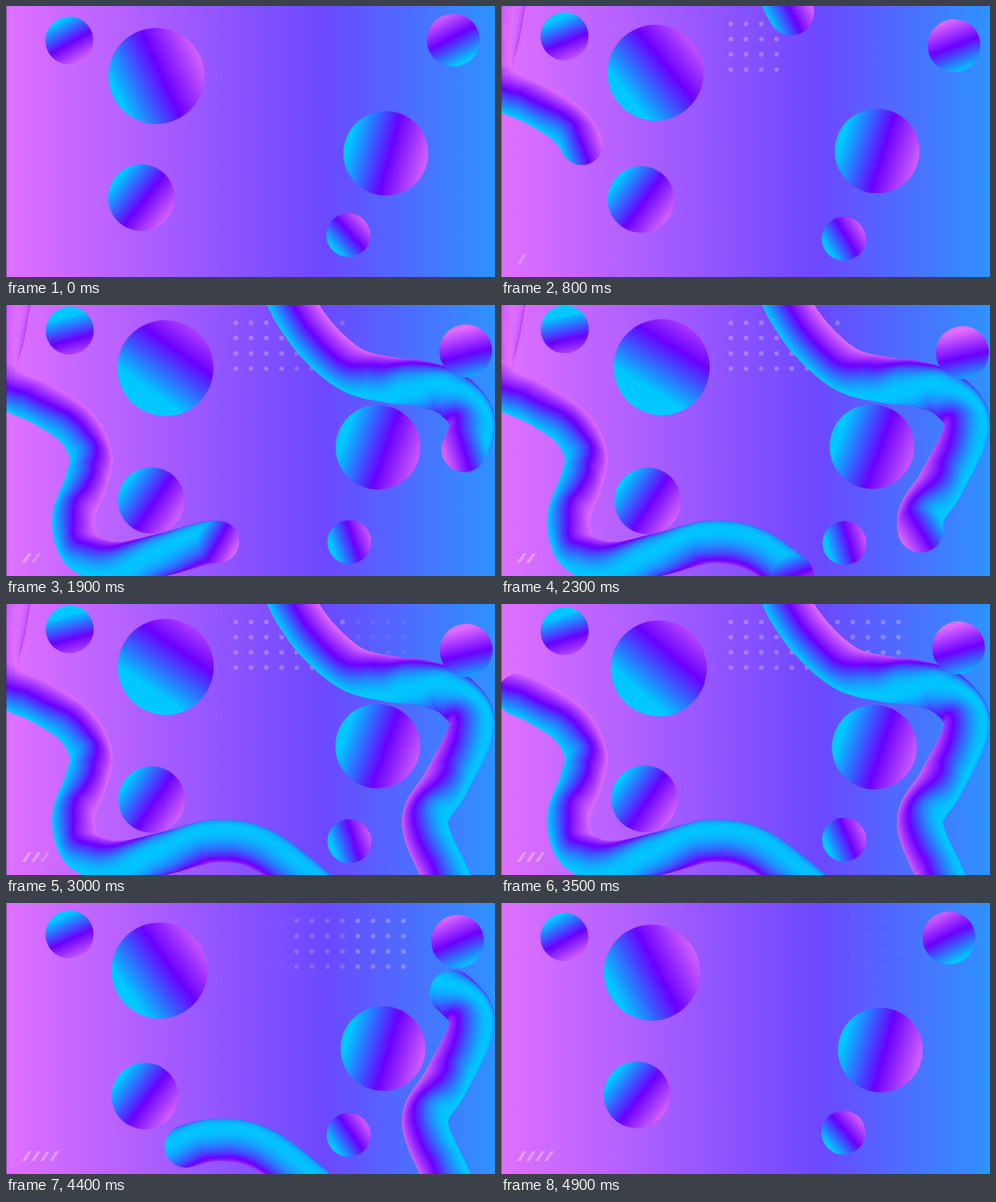
These frames come from a looping animation (600x333 px, 5 s). An HTML page with a canvas:

```html
<!DOCTYPE html>
<html lang="en">
<head>
<meta charset="utf-8">
<title>Fluid gradient shapes</title>
<style>
html, body { margin: 0; width: 100%; height: 100%; overflow: hidden; }
canvas { display: block; width: 600px; height: 333px; }
</style>
</head>
<body>
<canvas id="stage" width="600" height="333"></canvas>
<script>
const ctx = document.getElementById('stage').getContext('2d');
const W = 600, H = 333, LOOP = 5000;
const CYAN = '#00c8ff', VIOLET = '#6a00ff', PINK = '#e06eff';

const ramp = (t, from, to) => Math.min(1, Math.max(0, (t - from) / (to - from)));
const smooth = u => u * u * (3 - 2 * u);

function gradient(x0, x1, stops) {
  const g = ctx.createLinearGradient(x0, 0, x1, 0);
  stops.forEach(([at, color]) => g.addColorStop(at, color));
  return g;
}
const blend = (x0, x1) => gradient(x0, x1, [[0, CYAN], [0.5, VIOLET], [1, PINK]]);

// Disc with its cyan-to-pink axis turned to the given angle in degrees
function disc(x, y, r, angle, fill) {
  const c = Math.cos(angle * Math.PI / 180), s = Math.sin(angle * Math.PI / 180);
  ctx.setTransform(c, s, -s, c, x, y);
  ctx.fillStyle = fill;
  ctx.beginPath();
  ctx.arc(0, 0, r, 0, 7);
  ctx.fill();
  ctx.resetTransform();
}

// Stack of discs along a smooth path; twist(fraction) turns each disc
// relative to its direction of travel
function makeTube(r, knots, twist) {
  const spline = (a, b, c, d, u) => b + u / 2 * (c - a +
    u * (2 * a - 5 * b + 4 * c - d + u * (3 * (b - c) + d - a)));
  const at = i => knots[Math.min(knots.length - 1, Math.max(0, i))];
  const discs = [];
  let length = 0, last = knots[0];
  for (let i = 0; i < knots.length - 1; i++) {
    for (let k = 1; k <= 60; k++) {
      const [x, y] = [0, 1].map(n =>
        spline(at(i - 1)[n], at(i)[n], at(i + 1)[n], at(i + 2)[n], k / 60));
      const dx = x - last[0], dy = y - last[1];
      length += Math.hypot(dx, dy);
      discs.push({ x, y, at: length, heading: Math.atan2(dy, dx) * 180 / Math.PI });
      last = [x, y];
    }
  }
  for (const d of discs) {
    d.at /= length;
    d.angle = d.heading + twist(d.at);
  }
  return { r, discs, fill: blend(-r, r) };
}

function drawTube({ r, discs, fill }, start, end) {
  for (const d of discs) {
    if (d.at > start && d.at <= end) disc(d.x, d.y, r, d.angle, fill);
  }
}

const leftTube = makeTube(26, [
  [8, -27], [-2, 30], [-12, 80], [4, 103], [45, 122], [86, 150], [104, 185],
  [98, 218], [83, 260], [90, 297], [114, 313], [146, 317], [200, 305],
  [260, 291], [320, 305], [400, 368]
], u => -150 + 65 * smooth(ramp(u, 0.1, 0.19)) + 115 * smooth(ramp(u, 0.48, 0.78)));

const rightTube = makeTube(28, [
  [338, -30], [356, 8], [385, 47], [425, 80], [470, 92], [510, 97],
  [550, 112], [572, 150], [540, 219], [514, 268], [540, 335], [557, 370]
], u => -85 + 155 * smooth(ramp(u, 0.2, 0.75)));

// Radius, place, drift, axis angle, turn, and slide of the violet band
const balls = [
  [29.5, 77.7, 42.5, 0.5, -13, 60, 18, 0.35],
  [59, 184.5, 86, 13, -10, -25, -35, 0.4],
  [41, 166, 235.5, 14.5, 5.5, 38, -5, 0],
  [52, 466, 181, -11.3, -7.2, 15, 5, 0.1],
  [27, 420, 281.5, 1.5, 11.5, -42, 27, 0.1],
  [32.5, 548.8, 42, 18, 17, -118, 16, -0.3]
];

function drawBalls(t) {
  const drift = 1 - Math.pow(Math.abs(t / 2500 - 1), 1.3);
  for (const [r, x, y, dx, dy, angle, turn, slide] of balls) {
    const mid = 0.1 + slide * drift;
    disc(x + dx * drift, y + dy * drift, r, angle + turn * drift,
      blend((mid - 1) * r, (mid + 1) * r));
  }
}

function drawDots(t) {
  for (let col = 0; col < 12; col++) {
    const group = Math.floor(col / 4);
    const show = ramp(t, 1400 * group, 1400 * group + 700);
    const hide = ramp(t, 4000 + 250 * group, 4450 + 250 * group);
    ctx.fillStyle = `rgba(245,225,255,${0.3 * show * (1 - hide)})`;
    for (let row = 0; row < 4; row++) {
      ctx.beginPath();
      ctx.arc(282 + col * 18.7, 22 + row * 18.7, 2.9, 0, 7);
      ctx.fill();
    }
  }
}

function drawSlashes(t) {
  for (let i = 0; i < 4; i++) {
    const x = 19.5 + i * 11.2, start = 250 + 1130 * i;
    ctx.fillStyle = `rgba(255,255,255,${0.33 * ramp(t, start, start + 800)})`;
    ctx.beginPath();
    ctx.moveTo(x, 317);
    ctx.lineTo(x + 8, 305);
    ctx.lineTo(x + 12, 305);
    ctx.lineTo(x + 4, 317);
    ctx.fill();
  }
}

const backdrop = gradient(0, W, [[0, '#e070ff'], [0.65, '#6c48ff'], [1, '#2e92ff']]);

function draw(t) {
  ctx.fillStyle = backdrop;
  ctx.fillRect(0, 0, W, H);
  drawDots(t);
  drawTube(leftTube, ramp(t, 3120, 4900), Math.pow(ramp(t, 0, 2500), 0.92));
  drawTube(rightTube, ramp(t, 3960, 4880), ramp(t, 650, 2670));
  drawBalls(t);
  drawSlashes(t);
  ctx.fillStyle = 'rgba(60,30,110,0.55)';
  ctx.fillRect(0, 0, 1, H);
}

const begin = performance.now();
function tick() {
  draw((performance.now() - begin) % LOOP);
  requestAnimationFrame(tick);
}
tick();
</script>
</body>
</html>
```
